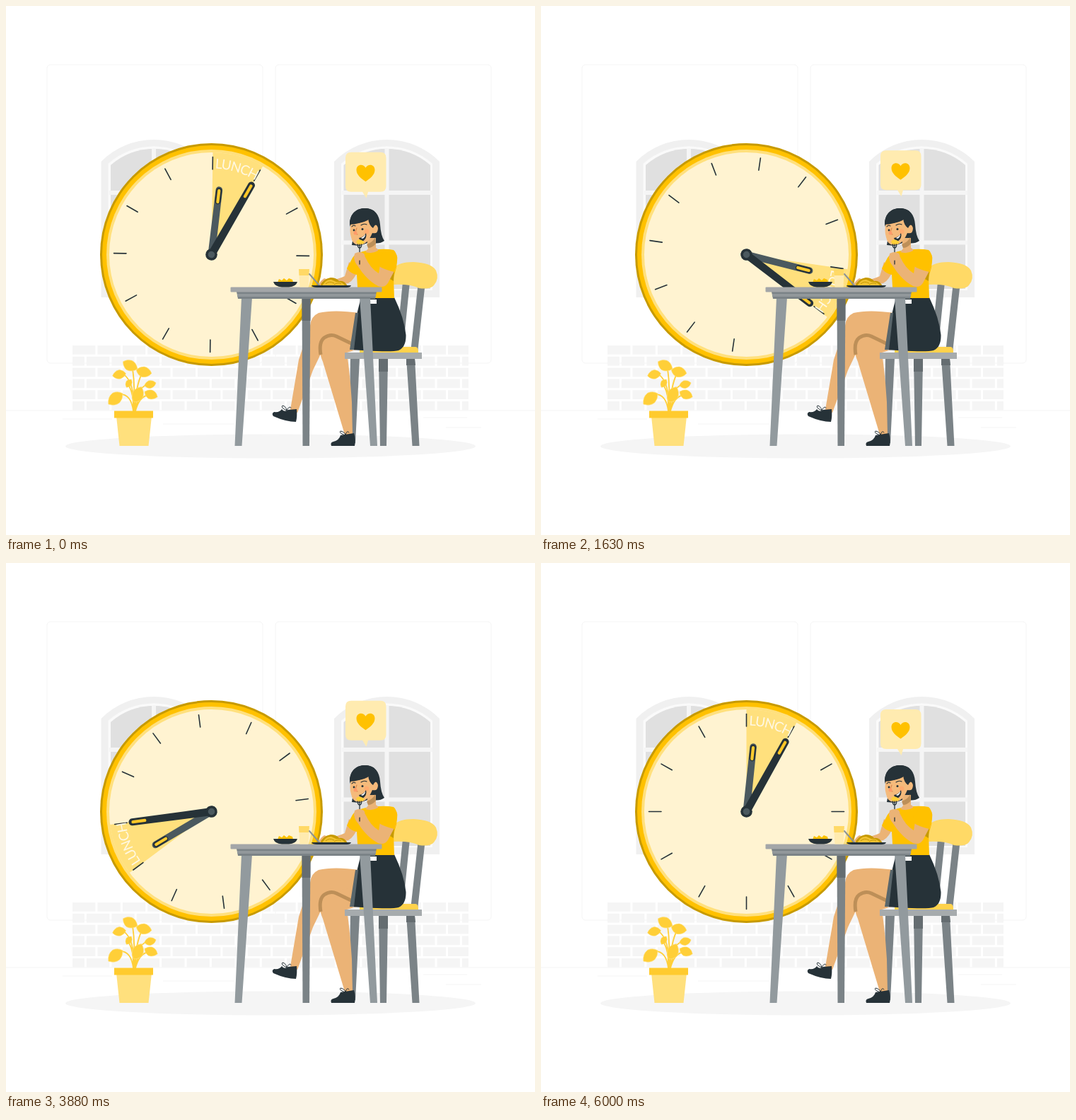
An HTML page for the animation above (6.04 s loop, 748x748 px).

```html
<!DOCTYPE html>
<html lang="en">
<head>
<meta charset="utf-8">
<title>Lunch time</title>
<style>
  html, body { margin: 0; width: 100%; height: 100%; overflow: hidden; background: #fff; }
  svg { display: block; width: 100vw; height: 100vh; }
  .ink { fill: #263238; }
  .sun { fill: #ffc100; }
  .pale { fill: #ffe07d; }
  .skin { fill: #ebb376; }
  .shade { fill: #bd8f58; }
  .steel { fill: #929a9e; }
  .iron { fill: #7b8387; }
  .line { fill: none; stroke: #263238; stroke-linecap: round; }
  #label { font: 400 19px Lato, "Open Sans", sans-serif; letter-spacing: -1.1px; fill: #fff8e4; }
</style>
</head>
<body>
<svg viewBox="0 0 748 748">
  <defs>
    <path id="arc" d="M0-122A122 122 0 0 1 122 0"/>
    <path id="leaf" d="M-12 0Q-7-8 2-8Q9-6 12 1Q8 7 1 8Q-7 8-12 0Z"/>
    <g id="window">
      <path fill="#f0f0f0" d="M464 412V220A105 105 0 0 1 613 220V412Z"/>
      <path fill="#fafafa" d="M474 402V223A97 97 0 0 1 603 223V402Z"/>
      <path fill="#e0e0e0" d="M477.500 400V225A92 92 0 0 1 600 225V400Z"/>
      <path fill="none" stroke="#f5f5f5" stroke-width="6" d="M538.500 202V402M475 264H603M475 334.500H603"/>
    </g>
  </defs>

  <g fill="none" stroke="#f5f5f5">
    <rect x="58" y="83" width="305" height="422" rx="5"/>
    <rect x="381" y="83" width="305" height="422" rx="5"/>
    <path d="M0 572H748M590 582H652M622 596H672M80 584H150M222 591H323"/>
  </g>
  <use href="#window" x="-329.500"/>
  <use href="#window"/>
  <g id="bricks" fill="#f5f5f5"></g>
  <ellipse cx="374" cy="622.500" rx="290" ry="17" fill="#f5f5f5"/>

  <!-- plant -->
  <path fill="none" stroke="#ffcf38" stroke-width="1.800"
    d="M180 573Q183 540 179 513M181 573Q184 536 192 520M180 573Q177 548 160 549M182 573Q186 560 187 555M183 573Q188 552 202 550M182 573Q184 542 198 536M180 573Q181 550 174 537M181 573Q182 530 165 520"/>
  <g id="leaves" fill="#ffcf38" stroke="#ffe07d" stroke-width=".600"></g>
  <path class="pale" d="M156 580H206L201.500 622H160.500Z"/>
  <path fill="#ffcb2e" d="M153 572.500H208V582.500H153Z"/>

  <!-- clock -->
  <g transform="translate(290.500 351.500)">
    <circle r="157.500" fill="#c79a00"/>
    <circle r="154.500" class="sun"/>
    <circle r="148.500" class="pale"/>
    <circle r="144.500" fill="#fff3d1"/>
    <g id="dial">
      <path class="pale" d="M0 0V-144.500A144.500 144.500 0 0 1 71-126Z"/>
      <g id="ticks" class="line" stroke-width="1.600"></g>
      <text id="label"><textPath href="#arc" startOffset="3.500">LUNCH</textPath></text>
      <g transform="rotate(6)">
        <path fill="#4b595f" d="M-5 0L-4.800-92A4.800 4.800 0 0 1 4.800-92L5 0Z"/>
        <path class="line" stroke-width="8.500" d="M0-76V-91"/>
        <path fill="none" stroke="#ffcb2e" stroke-width="4.200" stroke-linecap="round" d="M0-75V-91"/>
      </g>
      <g transform="rotate(29.200)">
        <path class="ink" d="M-5.500 0L-5-113A5 5 0 0 1 5-113L5.500 0Z"/>
        <path fill="none" stroke="#ffc727" stroke-width="4.200" stroke-linecap="round" d="M0-95V-112"/>
      </g>
      <circle r="8.300" class="ink"/>
      <circle r="4.800" fill="#4b595f"/>
    </g>
  </g>

  <!-- chair -->
  <path class="iron" d="M561 390H571L561 490H551ZM583 390H593L582 490H572ZM527 498H540L538 622H529ZM566 498H578L584.500 622H574.500ZM487 498H500L494 618H485Z"/>
  <path fill="#656d71" d="M527 499H540V517H527ZM566 499H578L579 508H566Z"/>
  <path fill="#ffd966" d="M548 371Q555 362 576 362Q602 363 608 374Q613 386 605 395Q600 401 584 399Q572 393 548 394Z"/>
  <path fill="#ffd24c" d="M500 490V486Q500 482 505 482H579Q583 482 583 490Z"/>

  <!-- legs -->
  <path class="skin" d="M500 434Q463 429 442 434Q431 439 430 452L414 500L402 571L412 575L434 515L447 488L500 470Z"/>
  <path class="skin" d="M497 440L490 487L503 484L482 490Q487 525 489 560L490 606H479L448 503Q441 487 445 476Q452 464 466 463L484 460Z"/>
  <path fill="none" stroke="#bd8f58" stroke-width="5" d="M445 493Q442 475 450 469Q459 463 467 467L492 479"/>
  <path class="ink" d="M390 570Q393 575 399 571L411 570Q412 580 410 588Q396 588 378 580Q375 576 379 574Q387 575 390 570Z"/>
  <path class="line" stroke-width="1" d="M397 572Q388 568 391 565Q396 566 397 572Q400 565 403 568"/>
  <path class="ink" d="M473 607L479 606L492 604Q495 613 493 622H460Q458 617 463 616Q471 614 473 607Z"/>
  <path class="line" stroke-width="1" d="M480 607Q470 604 473 601Q479 602 480 607Q482 599 485 603"/>
  <path class="ink" d="M502 412H549Q563 441 565.500 465Q566 482 555 487Q545 490 489 486Q494 456 497 432Z"/>
  <path fill="#59666b" d="M494 434H498L492 486H486Z"/>
  <path fill="#fff" d="M512 415H524V421H512Z"/>

  <!-- far arm, shirt -->
  <path class="skin" d="M485 362L479 382Q462 390 450 385Q444 389 442 394L452 397L484 392Q492 388 498 373Z"/>
  <path class="sun" d="M509 346Q494 349 490 356L482 371Q488 379 496 380L498 413H549L548 384L552 370Q555 350 548 345Q534 342 509 346Z"/>
  <path fill="#c79a00" d="M537 376L549 374L548 389L538 383Z"/>

  <!-- head -->
  <path class="ink" d="M486 309C486 293 496 286 508 286C521 286 528 295 529 309Q530 325 535 332Q527 338 514 334L500 339L489 338L491 326Z"/>
  <path class="skin" d="M510 328H523V342Q527 344 526 346Q518 351 508 348L512 343Z"/>
  <path class="shade" d="M510 337Q519 334 522 327L523 336Q518 342 512 342Z"/>
  <path fill="#f5ba7b" d="M488 306Q485 318 488 327Q490 338 499 338Q511 338 518 321Q526 323 526 314Q524 307 519 311L514 301Q503 309 488 306Z"/>
  <path class="ink" d="M486 309C486 293 496 286 508 286C521 286 527 295 528 309Q523 306 519 314Q513 310 512 300Q501 309 486 309Z"/>
  <g class="line" stroke-width="1.100">
    <path d="M489 312Q491 309 494 311M502 310Q506 307 510 309"/>
    <path stroke="#d9844d" d="M496 314L493 322L497 323"/>
  </g>
  <circle cx="492" cy="317" r="1.400" class="ink"/>
  <circle cx="504" cy="315.500" r="1.500" class="ink"/>
  <circle cx="494" cy="321" r="2.500" fill="#ff9a6a"/>
  <circle cx="510" cy="319" r="3.500" fill="#ffac70"/>
  <path class="ink" d="M499 328Q506 327 509 321Q511 329 504 333Q500 332 499 328Z"/>
  <path fill="#fff" d="M502 328Q506 326 508 323Q508 327 504 329Z"/>

  <!-- near arm, fork -->
  <path class="skin" d="M493 352Q491 361 497 367Q510 388 526 396Q537 400 542 388L551 371L529 366L527 378Q515 371 508 355Z"/>
  <path class="sun" d="M527 358Q534 345 546 346Q555 350 553 361L549 376Q535 373 526 367Z"/>
  <path fill="#ffcf38" d="M495 333Q499 327 507 334Q504 338 497 337Z"/>
  <path class="line" stroke="#747c80" stroke-width="1.300" d="M500 343V365M497.500 337V340Q500 345 502.500 340V337M500 337V343"/>
  <path class="skin" d="M493 350Q500 346 506 350Q509 354 506 358Q498 362 492 357Z"/>

  <!-- seat and table -->
  <path fill="#a6abad" d="M479 490H588V499H479Z"/>
  <path class="iron" d="M418.500 412H430.500L429 622H419.500Z"/>
  <path fill="#656d71" d="M418.500 413H430.500V445H418.500Z"/>
  <path class="steel" d="M333 412H348L333.500 622H323.500ZM500 412H515L525 622H515Z"/>
  <path class="iron" d="M326 404H524L522 414H328Z"/>
  <path fill="#92989b" d="M327 407H523V411H327Z"/>
  <rect x="317.500" y="397.500" width="214" height="7" rx="1" fill="#a3a6a8"/>

  <!-- meal -->
  <path class="sun" d="M384 391L386 386L390 388L393 385L397 388L400 385L405 387L406 391Z"/>
  <path class="ink" d="M378 390H412Q410 397 400 397.500H390Q380 397 378 390Z"/>
  <path fill="#ffebb0" d="M414 372H429L427.500 397.500H415.500Z"/>
  <path fill="#ffd966" d="M414 372H429L428 381H414.500Z"/>
  <path class="line" stroke-width="2" style="stroke:#8b9397" d="M429 379L443 395"/>
  <path fill="#c79a00" d="M444 396Q448 386 459 384Q467 384 471 389Q478 387 483 396Z"/>
  <path fill="#f1c232" d="M447 396Q452 386 460 387L467 390Q475 389 480 396Z"/>
  <path fill="none" stroke="#c79a00" d="M452 393Q457 388 464 392M464 394Q469 390 474 393"/>
  <path class="ink" d="M432 395H488Q487 398 482 398H440Q433 398 432 395Z"/>

  <g id="bubble">
    <path fill="#ffebb0" d="M488 207H529.500Q537.500 207 537.500 215V255Q537.500 263 529.500 263H512L509.500 272L504 263H488Q480 263 480 255V215Q480 207 488 207Z"/>
    <path class="sun" d="M508.500 248.500C502 244 495.500 239 495.500 232C495.500 224 505 222.500 508.500 229C512 222.500 521.500 224 521.500 232C521.500 239 515 244 508.500 248.500Z"/>
  </g>
</svg>
<script>
  const $ = id => document.getElementById(id);

  function add(parent, tag, attrs) {
    const el = document.createElementNS("http://www.w3.org/2000/svg", tag);
    for (const key in attrs) el.setAttribute(key, attrs[key]);
    $(parent).append(el);
  }

  // Six staggered rows of bricks, trimmed at both ends of the wall
  const [wallLeft, wallRight, pitch] = [94, 654, 35.4];
  for (let row = 0; row < 6; row++) {
    for (let x = wallLeft - (row % 2 ? 15.5 : 0); x < wallRight; x += pitch) {
      const left = Math.max(x, wallLeft);
      const width = Math.min(x + pitch - 3, wallRight) - left;
      if (width > 0) add("bricks", "rect", { x: left, y: 480 + row * 15.8, width, height: 12.8 });
    }
  }

  // Hour marks sit slightly nearer to the quarters than an even spacing
  for (let quarter = 0; quarter < 360; quarter += 90)
    for (const mark of [0, 29.2, 60.8])
      add("ticks", "path", { d: "M0-120.5V-138", transform: `rotate(${quarter + mark})` });

  // centre x, centre y, turn, size
  [
    [175.5, 508.5, 205, .95], [160, 521, -12, .8], [195, 517.5, 190, .92], [154.500, 555, -40, 1.05],
    [173.500, 533.5, -60, .55], [204, 535, 165, .7], [186.500, 549.5, 115, 1], [205, 549.5, 200, .82]
  ].forEach(([x, y, turn, size]) =>
    add("leaves", "use", { href: "#leaf", transform: `translate(${x} ${y}) rotate(${turn}) scale(${size})` }));

  const LOOP = 6040, TURN = 6000, STEP = 1000 / 24, LEAD = 13;
  const BOB = 1500, RISE = 15;

  function draw(now) {
    const shown = Math.floor((now % LOOP + 5) / STEP);
    const t = Math.min(shown * STEP + LEAD, TURN);
    const lift = RISE * (1 - Math.abs(1 - 2 * (t % BOB) / BOB));
    $("dial").setAttribute("transform", `rotate(${360 * t / TURN})`);
    $("bubble").setAttribute("transform", `translate(0 ${-lift})`);
  }

  const start = performance.now();
  function tick() {
    draw(performance.now() - start);
    requestAnimationFrame(tick);
  }
  tick();
</script>
</body>
</html>
```
